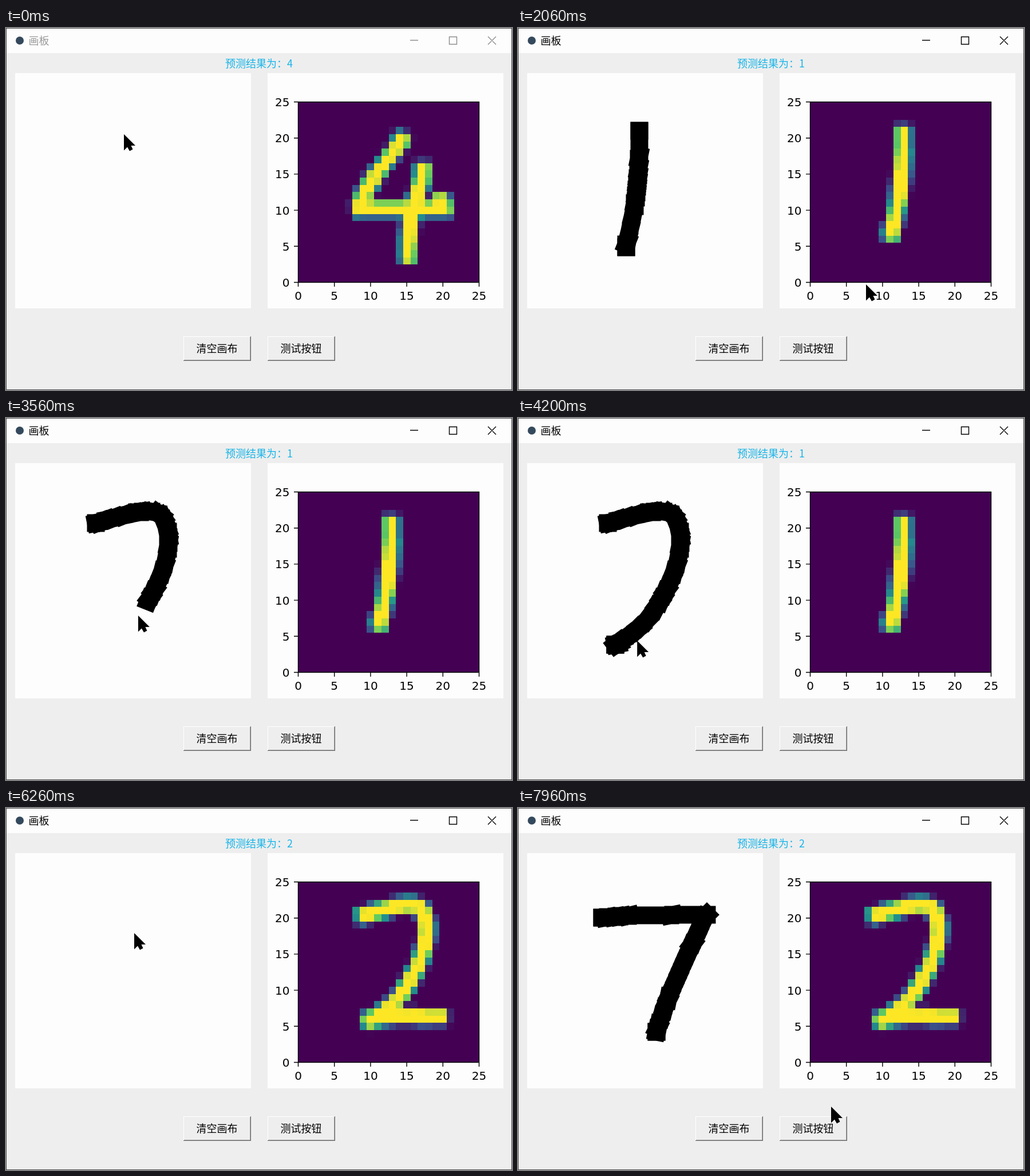
An HTML page with a canvas for the animation above (8 s loop, 884 by 634 pixels).

```html
<!DOCTYPE html>
<html lang="zh-CN">
<head>
<meta charset="utf-8">
<title>画板</title>
<style>
  html, body { margin: 0; width: 100%; height: 100%; overflow: hidden; background: #eee; }
  svg, canvas { position: absolute; left: 0; top: 0; display: block; }
  #pad { left: 16px; top: 79px; }
  #heat { left: 510px; top: 129px; }
  text { font: 18px "Noto Sans CJK SC", "Noto Sans CJK", "Noto Sans", sans-serif; }
  .num text { font: 20px "DejaVu Sans", sans-serif; }
  .mid { text-anchor: middle; }
  .end { text-anchor: end; }
</style>
</head>
<body>
<svg width="884" height="634">
  <rect width="884" height="634" fill="#eee"/>
  <rect width="884" height="44" fill="#fdfdfd"/>
  <circle cx="24" cy="22" r="7" fill="#34495c"/>
  <text id="title" x="39.5" y="29">画板</text>
  <path id="controls" d="M706 21.5h14M774.5 15.5h13v13h-13zM842 15l14 14M856 15l-14 14" fill="none" stroke-width="1.4"/>
  <text id="label" class="mid" x="442" y="68.5" fill="#17b4e8"></text>
  <path d="M16 79h412v412h-412zM457 79h412v412h-412z" fill="#fdfdfd"/>
  <g id="buttons"></g>
  <rect x=".5" y=".5" width="883" height="633" fill="none" stroke="#4c4c4c"/>
</svg>
<canvas id="pad" width="412" height="412"></canvas>
<canvas id="heat" width="317" height="317"></canvas>
<svg width="884" height="634">
  <g id="axes" class="num" fill="none" stroke="#000" stroke-width="1.4">
    <rect x="510.5" y="129.5" width="316" height="316"/>
  </g>
  <path id="cursor" d="M0 0L20 20H12.5L15.5 26.5L10 29.5L6 22.5L0 28.5Z"/>
</svg>
<script>
const LOOP = 8000, PAD = 412, GRID = 28, CELL = 317 / 25;
const BRUSH = 31, STEP = 5, INK_LAG = 50;
const $ = id => document.getElementById(id);
const mix = (a, b, k) => a + (b - a) * k;

// A pen stroke: a curve sampled at whole pixels, as mouse events report it.
function stroke(d, start = 0, stop = 0) {
  const curve = document.createElementNS('http://www.w3.org/2000/svg', 'path');
  curve.setAttribute('d', d);
  const length = curve.getTotalLength(), n = Math.ceil(length / STEP);
  const points = Array.from({ length: n + 1 }, (_, i) => {
    const p = curve.getPointAtLength(length * i / n);
    return [Math.round(p.x), Math.round(p.y)];
  });
  return { start, stop, points };
}

const digits = {
  4: [
    stroke('M232 195C205 240 160 280 149 333H321'),
    stroke('M312 317h2'),
    stroke('M276 254C275 300 247 320 247 430')
  ],
  1: [stroke('M212 180C213 250 206 320 189 380v4', 240, 850)],
  2: [
    stroke('M157 184C200 172 262 150 275 176S290 240 258 303S196 379 170 397', 3060, 3690),
    stroke('M170 397q25 -8 60 -8l81 1', 4140, 4360)
  ],
  7: [stroke('M147 192L202 188L330 187l-4 4C305 240 265 315 242 392', 6480, 7600)]
};

// Which digit is on the pad, and which one has been predicted.
const drawings = [[0, 1], [2450, 2], [5780, 7]];
const results = [[0, 4], [1400, 1], [4650, 2]];
const current = (list, t) => list.filter(e => e[0] <= t).pop()[1];

const strokes = [...digits[1], ...digits[2], ...digits[7]];
const testAt = [518, 553], clearAt = [385, 561];
const last = s => s.points[s.points.length - 1];
const stops = [
  [0, 206, 186],
  [1200, ...testAt], [1480, ...testAt], [1820, 608, 449], [2060, 608, 449],
  [2330, ...clearAt], [2500, ...clearAt], [2870, 280, 324],
  [4580, ...testAt], [5370, ...testAt],
  [5640, ...clearAt], [5830, ...clearAt], [6200, 224, 219], [6260, 224, 219],
  [7800, 310, 428], [7960, 547, 523], [LOOP, 547, 523],
  ...strokes.map(s => [s.start, ...s.points[0]]),
  ...strokes.map(s => [s.stop, ...last(s)])
].sort((a, b) => a[0] - b[0]);

function progress(s, t) {
  const k = Math.min(1, Math.max(0, (t - s.start) / (s.stop - s.start || 1)));
  const at = k * (s.points.length - 1), i = Math.floor(at);
  const a = s.points[i], b = s.points[i + 1] || a;
  return { i, head: [mix(a[0], b[0], at - i), mix(a[1], b[1], at - i)] };
}

function cursorAt(t) {
  const active = strokes.find(s => t >= s.start && t < s.stop);
  if (active) return progress(active, t).head;
  const n = stops.findIndex(s => s[0] > t);
  const a = stops[n - 1], b = stops[n];
  const k = (t - a[0]) / (b[0] - a[0]), e = k * k * (3 - 2 * k);
  return [mix(a[1], b[1], e), mix(a[2], b[2], e)];
}

// Short square-capped segments give the brush its rough edge.
function paint(ctx, list, t) {
  const dot = ([x, y]) => ctx.fillRect(x - BRUSH / 2, y - BRUSH / 2, BRUSH, BRUSH);
  ctx.lineWidth = BRUSH;
  ctx.lineCap = 'square';
  for (const s of list) {
    if (t < s.start) continue;
    const { i, head } = progress(s, t);
    ctx.beginPath();
    for (let j = 0; j < i; j++) {
      ctx.moveTo(...s.points[j]);
      ctx.lineTo(...s.points[j + 1]);
    }
    ctx.moveTo(...s.points[i]);
    ctx.lineTo(...head);
    ctx.stroke();
    dot(s.points[0]);
    if (t >= s.stop) dot(last(s));
  }
}

const ramp = [[68, 1, 84], [59, 82, 139], [33, 145, 140], [94, 201, 98], [253, 231, 37]];
function viridis(v) {
  const at = Math.min(0.9999, v) * 4, i = Math.floor(at);
  return `rgb(${ramp[i].map((c, j) => Math.round(mix(c, ramp[i + 1][j], at - i)))})`;
}

// Shrink a drawing to the grid by averaging its ink in every cell.
function shrink(list) {
  const sub = 16, size = GRID * sub;
  const c = document.createElement('canvas');
  c.width = c.height = size;
  const ctx = c.getContext('2d');
  ctx.scale(size / PAD, size / PAD);
  ctx.translate(-16, -79);
  paint(ctx, list, LOOP);
  const data = ctx.getImageData(0, 0, size, size).data;
  const cells = new Float32Array(GRID * GRID);
  for (let y = 0; y < size; y++)
    for (let x = 0; x < size; x++)
      cells[(y / sub | 0) * GRID + (x / sub | 0)] += data[(y * size + x) * 4 + 3] / 255 / sub / sub;
  return cells;
}

const heat = $('heat').getContext('2d');
function drawHeat(digit) {
  const cells = shrink(digits[digit]);
  const edge = i => Math.round((i - 0.5) * CELL);
  for (let v = 0; v <= 25; v++)
    for (let x = 0; x <= 25; x++) {
      heat.fillStyle = viridis(cells[(GRID - 1 - v) * GRID + x]);
      heat.fillRect(edge(x), 317 - edge(v + 1), edge(x + 1) - edge(x), edge(v + 1) - edge(v));
    }
}

const button = (x, text) => `
  <g transform="translate(${x} 540)">
    <rect width="118" height="43" fill="#696969"/>
    <rect width="117" height="42" fill="#fff"/>
    <rect x="1" y="1" width="116" height="41" fill="#a0a0a0"/>
    <rect x="1" y="1" width="115" height="40" fill="#eee"/>
    <text class="mid" x="58.5" y="27.5">${text}</text>
  </g>`;
$('buttons').innerHTML = button(310, '清空画布') + button(457, '测试按钮');

let axes = '';
for (let v = 0; v <= 25; v += 5) {
  const x = 510.5 + v * 316 / 25, y = 445.5 - v * 316 / 25;
  axes += `<path d="M503 ${y}h7M${x} 446v7"/>
    <g fill="#000" stroke="none">
      <text class="end" x="495.5" y="${y + 7.5}">${v}</text>
      <text class="mid" x="${x}" y="476">${v}</text>
    </g>`;
}
$('axes').innerHTML += axes;

const pad = $('pad').getContext('2d');
pad.translate(-16, -79);
let shown = null;

function render(t) {
  const focused = t >= strokes[0].start;
  $('title').setAttribute('fill', focused ? '#000' : '#999');
  $('controls').setAttribute('stroke', focused ? '#000' : '#8c8c8c');

  const result = current(results, t);
  if (result !== shown) {
    shown = result;
    $('label').textContent = '预测结果为：' + result;
    drawHeat(result);
  }

  pad.clearRect(16, 79, PAD, PAD);
  paint(pad, digits[current(drawings, t)], t - INK_LAG);
  $('cursor').setAttribute('transform', `translate(${cursorAt(t)})`);
}

const began = performance.now();
function tick() {
  render((performance.now() - began) % LOOP);
  requestAnimationFrame(tick);
}
render(0);
requestAnimationFrame(tick);
</script>
</body>
</html>
```
